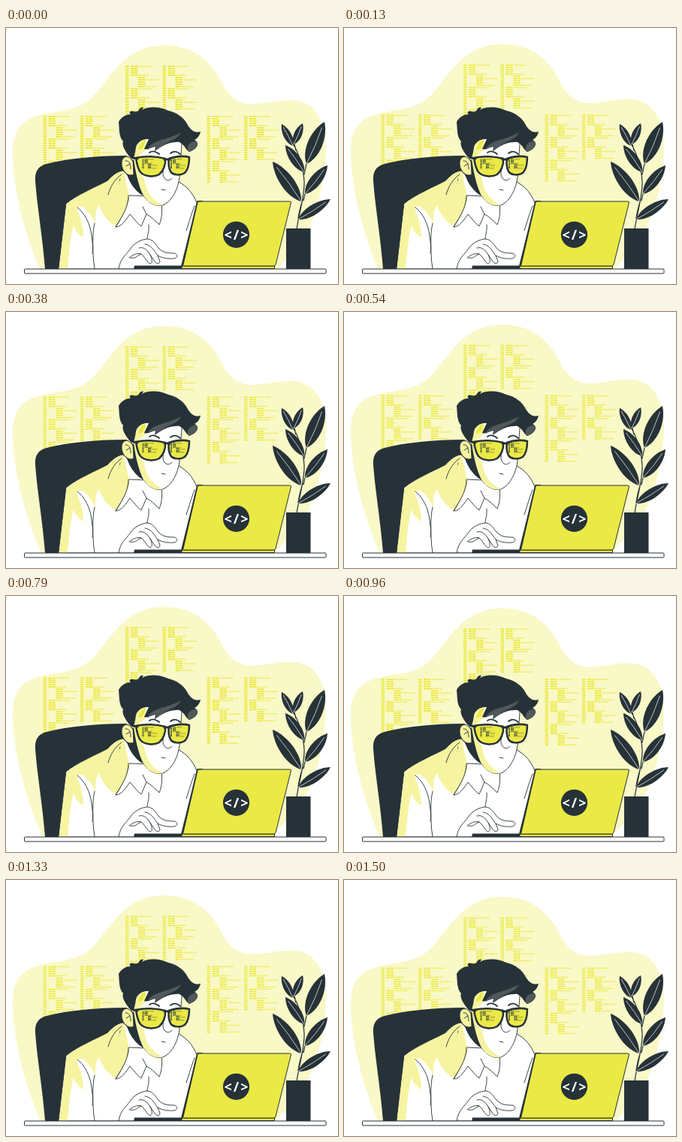
Write an HTML page that moves like this. It is 442 by 341 pixels and loops after 1540 ms.

```html
<!DOCTYPE html>
<html lang="en">
<head>
<meta charset="utf-8">
<title>Programmer at a laptop</title>
<style>
html, body { margin: 0; width: 100%; height: 100%; overflow: hidden; background: #fff; }
svg { display: block; width: 442px; height: 341px; }
.ink { fill: #263238; }
.lime { fill: #ebe945; }
.pale { fill: #f6f4a0; }
.skin { fill: #fff; stroke: #263238; stroke-width: .9; stroke-linejoin: round; }
.line { fill: none; stroke: #263238; stroke-width: .9; stroke-linecap: round; stroke-linejoin: round; }
.vein { fill: none; stroke: #fff; stroke-width: .7; }
text { font: 700 18px "Open Sans", "Noto Sans", sans-serif; letter-spacing: 2px; fill: #fff; }
</style>
</head>
<body>
<svg viewBox="0 0 442 341">
  <defs>
    <clipPath id="above"><rect width="442" height="321"/></clipPath>
    <clipPath id="faceClip"><path d="M169 140V160C170 180 174 203 181 219C187 233 201 240 211 235C222 229 229 214 231 199L235 140Z"/></clipPath>
  </defs>

  <g clip-path="url(#above)">
    <g id="back">
      <path fill="#f9f8c7" d="M54 340C33 300 9 224 9 165C9 140 18 124 41 117C74 108 98 112 119 88C141 62 161 23 210 23C249 23 272 43 287 72C297 93 311 104 336 101C359 98 372 95 388 97C413 101 426 127 426 157C426 198 414 262 385 296C376 306 364 318 348 335Z"/>
      <g id="code"></g>
    </g>
  </g>

  <!-- chair -->
  <path class="ink" d="M52 321C49 280 41 235 39 203C38 191 43 184 54 181C82 174 118 170 160 170L200 195L212 240L71 321Z"/>

  <!-- shirt -->
  <path class="skin" d="M70 321L80 234C94 222 119 213 135 204C142 196 149 191 156 190L188 224L207 233L230 205C241 211 249 220 254 233L234 321Z"/>
  <path class="pale" d="M70.500 320.500L80.500 234.500C97 221 120 212 135 204C142 196 150 190 157 191L163 228C163 241 154 252 146 264C135 258 128 248 124 236C119 242 119 250 119 260C115 252 110 244 103 239C98 236 92 238 96 246C100 255 103 268 103 279C98 276 93 272 90 263C86 275 84 300 82 320.500Z"/>
  <path class="line" d="M154 195C145 201 139 211 136 222M152 201C150 211 152 220 149 229M95 239C105 247 112 260 114 277C117 293 115 306 118 321M118 260C114 277 117 290 115 300"/>
  <path class="ink" d="M161 195L172 194L190 226C178 224 166 211 161 195Z"/>
  <path class="skin" d="M164 223C162 240 153 253 146 265C154 265 160 255 165 248C170 253 174 260 180 264L187 248C193 251 199 257 204 262C208 253 208 242 207 233L187 224Z"/>
  <path class="pale" d="M157 192L164 224C163 239 154 252 147 262L140 252L151 205Z"/>
  <path class="line" d="M163 223C163 240 153 253 146 265M187 248L182 238M190 262C191 272 187 278 188 284M240 270C244 258 246 250 251 237"/>

  <!-- head -->
  <path class="skin pale" style="fill:#f6f4a0" d="M169 178C164 168 154 170 154 180C154 190 162 199 170 195Z"/>
  <path class="line" d="M159 177C164 176 166 182 166 188M160 184L165 181"/>
  <path class="skin" d="M169 140V160C170 180 174 203 181 219C187 233 201 240 211 235C222 229 229 214 231 199L235 140Z"/>
  <path clip-path="url(#faceClip)" class="pale" d="M165 150L184 147L189 160L177 171L178 194L184 200C185 215 193 229 209 236L190 242L165 205Z"/>
  <path class="line" d="M211 184C208 191 208 199 213 202C216 204 220 202 221 200M207 215L212 216"/>
  <path class="line" style="stroke-width:1.800" d="M191 166C195 163 200 165 204 168M219 167C224 163 229 165 232 168"/>

  <!-- hair -->
  <path class="ink" d="M167 174C157 164 154 154 156 151C150 145 151 134 150 125C154 118 160 115 166 115C163 113 165 110 169 111C174 112 176 111 177 109C178 106 181 105 183 106L181 109C193 103 207 106 216 110C228 113 237 119 243 131C248 138 253 140 259 138C258 143 255 147 251 149C258 152 256 161 244 165C241 163 239 160 237 157C233 153 231 151 227 152C215 152 207 158 198 164L199 158C192 159 187 163 184 161L190 148C181 147 174 153 173 159C172 166 171 171 169 174Z"/>
  <path fill="#50585c" d="M188 162C194 151 205 150 217 146C225 143 230 141 233 139C230 147 220 150 212 154L199 163L200 157ZM243 165C239 156 246 150 254 151C256 157 251 162 243 165Z"/>
  <path class="lime" d="M176 163C177 156 180 151 187 149L182 160Z"/>

  <!-- glasses -->
  <g stroke="#263238" stroke-width="2.500" stroke-linejoin="round" class="lime">
    <path d="M173 173C185 170 201 171 212 174C213 182 209 191 204 195C197 199 184 198 179 192C175 187 174 180 173 173Z"/>
    <path d="M217 174C226 171 236 170 244 172C244 180 242 189 238 193C232 197 222 196 219 191C217 187 216 180 217 174Z"/>
  </g>
  <path class="line" style="stroke-width:3" d="M170 173L175 174M211 175L218 175"/>
  <g id="lens"></g>

  <!-- hand -->
  <path class="skin" d="M150 321C152 307 160 302 165 295C169 287 181 281 189 281C196 282 199 288 203 293C208 299 215 300 224 300C229 301 229 306 224 307C215 308 207 306 202 303L205 311C204 315 200 314 198 311L192 302C195 309 195 313 192 314C188 313 186 306 180 301L176 303C173 306 169 307 165 306"/>
  <path class="line" d="M177 293C184 291 188 296 192 302M185 288C194 289 197 297 202 303M180 301C174 299 168 303 164 306"/>

  <!-- laptop -->
  <path class="ink" d="M171 316.500H236V321H170Z"/>
  <path class="lime" stroke="#263238" d="M234 317H357.500V320.500H234Z"/>
  <path class="ink" d="M254.500 230H262L240 317H233Z"/>
  <path class="lime" stroke="#263238" stroke-linejoin="round" d="M257 231H377.500Q380 231 379.400 233L359 315Q358.500 317 356 317H235.500L255 232.500Q255.400 231 257 231Z"/>
  <circle class="ink" cx="306.500" cy="275.300" r="17.600"/>
  <text x="307.500" y="281.500" text-anchor="middle">&lt;/&gt;</text>

  <!-- plant -->
  <path class="line" style="stroke-width:1.200" d="M387 268C390 247 398 222 397 204C396 185 389 165 382 154M389 254C390 244 393 235 395 228M398 221L396 230M400 181L397 195M384 155L386 163"/>
  <g id="leaves"></g>
  <path class="ink" d="M373 267H405.500V321H373Z"/>

  <!-- desk -->
  <rect x="24.500" y="321" width="401.500" height="6" rx="1" fill="#fff" stroke="#263238"/>
</svg>
<script>
const LOOP = 1540, LIFT = 9;
const byId = id => document.getElementById(id);

// Each row: indent, solid length, dotted length
const ROWS = [[7, 10, 17], [7, 9, 0], [7, 10, 0], [7, 9, 0], [7, 11, 12],
              [17, 9, 0], [17, 10, 17], [17, 9, 0], [17, 10, 0], [17, 7, 17]];

function block(x, y, scale = 1, color = "#ebe945") {
  let d = "", dots = "";
  ROWS.forEach(([indent, solid, dotted], i) => {
    const top = i * 3 + 1;
    d += `M0 ${top}h4.500M${indent} ${top}h${solid}`;
    if (dotted) dots += `M${indent + solid + 1} ${top}h${dotted}`;
  });
  return `<g transform="translate(${x} ${y}) scale(${scale})" fill="none" stroke="${color}">
    <path d="${d}" stroke-width="1.800" stroke-dasharray="4.500 .5"/>
    <path d="${dots}" stroke-width="1.500" stroke-dasharray="1.700 .8"/></g>`;
}

byId("code").innerHTML = [[49.500, 117], [159, 50], [267.500, 117]].map(([x, y]) =>
  [0, 1, 2].map(i => block(x, y + i * 30)).join("") +
  [0, 1].map(i => block(x + 49.500, y + i * 30)).join("")).join("");

byId("lens").innerHTML = [181.500, 219].map(x => block(x, 174.500, .44, "#263238")).join("");

// Base, tip, and the bulge on each side of the midrib
function leaf([bx, by, tx, ty, bulge]) {
  const dx = tx - bx, dy = ty - by, len = Math.hypot(dx, dy);
  const nx = -dy / len * bulge, ny = dx / len * bulge;
  const at = (k, s) => `${bx + dx * k + nx * s} ${by + dy * k + ny * s}`;
  return `<path class="ink" d="M${bx} ${by}C${at(.22, 1)} ${at(.7, 1)} ${tx} ${ty}C${at(.7, -1)} ${at(.22, -1)} ${bx} ${by}Z"/>
    <path class="vein" d="M${bx} ${by}Q${at(.45, .15)} ${at(.86, 0)}"/>`;
}

byId("leaves").innerHTML = [
  [382, 157, 367, 128, 7], [383, 155, 395, 127, 7], [400, 181, 424, 125, 13],
  [397, 192, 372, 156, 9], [393, 231, 355, 178, 12], [398, 221, 428, 183, 10],
  [389, 255, 432, 228, 9]
].map(leaf).join("");

const back = byId("back");
function draw(now) {
  const p = now % LOOP / LOOP;
  const rise = 1 - Math.abs(2 * p - 1);
  back.setAttribute("transform", `translate(0 ${-LIFT * rise})`);
}

const start = performance.now();
function tick() {
  draw(performance.now() - start);
  requestAnimationFrame(tick);
}
draw(0);
requestAnimationFrame(tick);
</script>
</body>
</html>
```
